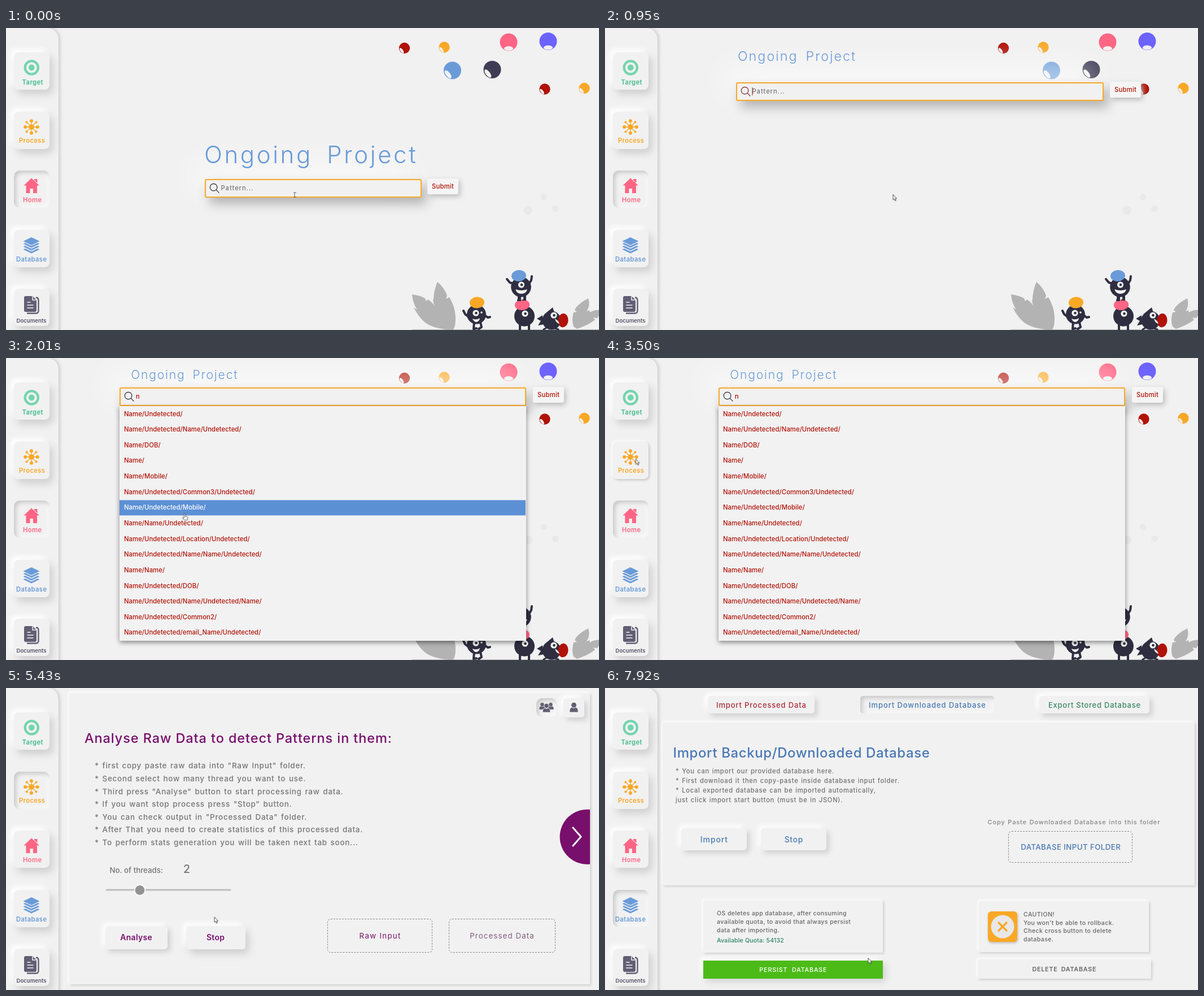
An HTML page that plays this animation: 1050x534 px, repeating every 8000 ms.

```html
<!DOCTYPE html>
<html lang="en">
<head>
<meta charset="utf-8">
<title>Pattern console</title>
<style>
html, body { margin: 0; width: 100%; height: 100%; overflow: hidden; background: #f1f1f1; }
#stage { position: relative; width: 1050px; height: 534px; overflow: hidden; font-family: Inter, sans-serif; }
.scene, svg.layer { position: absolute; left: 0; top: 0; width: 1050px; height: 534px; }
.scene { background: #f1f1f1; overflow: hidden; }
svg { overflow: visible; }
text { font-family: Inter, sans-serif; font-weight: 500; white-space: pre; }
.box { position: absolute; box-sizing: border-box; background: #f1f1f1; }
.side { border-radius: 0 20px 0 0; box-shadow: 2px 0 6px #c4c4c4; }
.card { border-radius: 8px; box-shadow: 6px 8px 14px #cfcfcf, -6px -6px 10px #fff; }
.active { border-radius: 10px; box-shadow: inset 4px 4px 7px #cacaca, inset -3px -3px 6px #fafafa; }
.button { border-radius: 5px; box-shadow: 5px 5px 10px #d0d0d0, -5px -5px 10px #fff; }
.panel { box-shadow: 2px 2px 4px #cdcdcd, -2px -2px 4px #fff; }
.folder { border: 1px dashed #8a8a8a; border-radius: 6px; background: none; }
.field { border: 2.5px solid #f9a826; border-radius: 3px; box-shadow: 8px 11px 20px #b2b2b2, -20px -20px 60px #fff; }
.field svg { position: absolute; left: 0; top: 0; }
.submit { border-radius: 3px; background: #f5f5f5; box-shadow: 3px 4px 10px #bbb; }
.drop { background: #f2f2f2; box-shadow: 0 3px 8px rgba(0, 0, 0, .45); }
</style>
</head>
<body>
<div id="stage"></div>
<script>
const LOOP = 8000;
const RED = '#b01207', ORANGE = '#f9a826', PINK = '#ff6584', BLUE = '#6a9bd8', INK = '#2f2e41',
  SLATE = '#625f74', PURPLE = '#780f6c', GREY = '#757575', NAVY = '#4a78b4';
const RAISED = '6px 8px 14px #cfcfcf, -6px -6px 10px #fff';
const LOW = '2px 2px 4px #c6c6c6, -2px -2px 4px #fff';

// Keyframes written in milliseconds; the last state holds to the end of the loop.
let css = '';
const key = (name, frames) => {
  const all = [...frames, [LOOP, frames[frames.length - 1][1]]];
  css += `@keyframes ${name}{${all.map(([ms, rule]) => `${ms * 100 / LOOP}%{${rule}}`).join('')}}
    .${name}{animation:${name} ${LOOP}ms linear infinite}`;
};
const show = (name, ...toggles) => {
  const state = (on) => `opacity:${on};animation-timing-function:step-end`;
  const start = toggles[0] === 0 ? [] : [[0, state(0)]];
  key(name, [...start, ...toggles.map((ms, i) => [ms, state(i % 2 ? 0 : 1)])]);
};
const EASE = 'animation-timing-function:ease';

const box = (x, y, w, h, cls, inner = '', style = '') =>
  `<div class="box ${cls}" style="left:${x}px;top:${y}px;width:${w}px;height:${h}px;${style}">${inner}</div>`;
const layer = (inner) => `<svg class="layer" viewBox="0 0 1050 534">${inner}</svg>`;
const text = (x, y, size, fill, str, space = 0, more = '') =>
  `<text x="${x}" y="${y}" font-size="${size}" fill="${fill}" letter-spacing="${space}" ${more}>${str}</text>`;
const mid = (x, y, size, fill, str, space = 0, more = '') =>
  text(x + space / 2, y, size, fill, str, space, `text-anchor="middle" ${more}`);
const lines = (x, y, step, size, fill, list, space, more) =>
  list.map((str, i) => text(x, y + i * step, size, fill, str, space, more)).join('');
const disc = (x, y, r, fill, more = '') => `<circle cx="${x}" cy="${y}" r="${r}" fill="${fill}" ${more}/>`;
const oval = (x, y, rx, ry, fill, turn = 0) =>
  `<ellipse rx="${rx}" ry="${ry}" fill="${fill}" transform="translate(${x} ${y}) rotate(${turn})"/>`;
const path = (d, fill, more = '') => `<path d="${d}" fill="${fill}" ${more}/>`;
const line = (d, stroke, width, more = '') =>
  path(d, 'none', `stroke="${stroke}" stroke-width="${width}" stroke-linecap="round" stroke-linejoin="round" ${more}`);

// Sidebar
const network = () => {
  let out = disc(45, 175, 4.8, ORANGE);
  for (let i = 0; i < 8; i++) {
    const reach = i % 2 ? 12 : 10.8, a = i * Math.PI / 4;
    const x = 45 + reach * Math.cos(a), y = 175 + reach * Math.sin(a);
    out += line(`M45 175L${x} ${y}`, ORANGE, 1.3) + disc(x, y, i % 2 ? 2 : 3, ORANGE);
  }
  return out;
};
const layers = () => path('M45 370L59.5 377L45 384L30.5 377Z', BLUE) +
  [0, 5, 10].map((d) => path(`M30.5 ${381.5 + d}L34 ${380 + d}L45 ${385.3 + d}L56 ${380 + d}L59.5 ${381.5 + d}L45 ${388.5 + d}Z`, BLUE)).join('');
const icons = () =>
  `<circle cx="45.3" cy="70" r="11.6" fill="none" stroke="#73d5ad" stroke-width="4.2"/>` + disc(45.3, 70, 5.4, '#73d5ad') +
  network() +
  path('M45 265.5L59 278.5H55V292H48V284H42.5V292H35.5V278.5H31.5ZM50 267H55.5V274L50 269Z', PINK) +
  layers() +
  line('M38 504.5H53Q57.5 504.5 57.5 500V481Q57.5 477.5 54 476.5', SLATE, 2.4) +
  path('M35 474H47L54 481V499Q54 502 51 502H35Q32 502 32 499V477Q32 474 35 474Z', SLATE) +
  line('M47 475V481H53M38 485H43M38 490H48M38 495H48', '#f1f1f1', 1.5);
const LABELS = [['Target', '#3dbb88', 100, 47], ['Process', ORANGE, 202.5, 46], ['Home', PINK, 308, 46.5],
  ['Database', BLUE, 413, 45], ['Documents', '#56546a', 520.5, 45]];
const sidebar = (active, hoverIndex, hoverClass) =>
  box(0, 0, 93, 540, 'side') +
  LABELS.map((_, i) => box(13.5, 43 + i * 104.5, 63, 66,
    i === active ? 'active' : `card ${i === hoverIndex ? hoverClass : ''}`)).join('') +
  layer(icons() + LABELS.map(([name, fill, y, x], i) =>
    mid(x, y, i === 4 ? 9.6 : 11.2, fill, name, i === 4 ? 0 : .4, 'style="font-weight:600"')).join(''));

// Home scene
const ball = (x, y, r, fill, facing) => disc(x, y, r, fill) + (facing === 'down'
  ? oval(x, y + r * .72, r * .52, r * .25, '#f1f1f1')
  : oval(x - r * .5, y + r * .45, r * .24, r * .56, '#f1f1f1', -38));
const balls = () =>
  ball(705.5, 35.5, 9.7, RED) + ball(776, 34, 9.7, ORANGE) + ball(954, 108, 9.7, RED) + ball(1024, 106.5, 9.7, ORANGE) +
  ball(790.5, 75, 15.5, BLUE) + ball(861, 73.5, 15.5, '#3f3d56') +
  ball(890, 25, 15.5, PINK, 'down') + ball(960, 23.5, 15.5, '#6c63ff', 'down') +
  disc(924, 322, 8, '#e9e9e9') + disc(952.5, 299, 5.8, '#e9e9e9') + disc(973, 319.5, 5.8, '#e9e9e9');
const eye = (x, y) => disc(x, y, 5.6, '#f4f4f4') + disc(x + .5, y, 2.3, INK);
const creatures = () =>
  path('M719 471Q734 473 742 478L744 483L747 480Q754 484 759 492Q755 484 757 479Q758 462 764 449Q776 459 781 473L779 479L785 476Q796 494 796 514Q796 530 791 534Q750 532 736 515Q727 505 722 494L728 498Q720 486 719 471Z', '#b3b3b3') +
  path('M1031 478Q1010 489 1007 499L1011 502L1005 503Q1001 518 1005 528L1011 532Q1030 526 1043 516L1040 512L1047 513L1056 499Q1042 497 1034 503L1033 499L1028 501Q1035 491 1031 478Z', '#b3b3b3') +
  line('M719 533.6H1050', '#a9a9ad', 1) +
  line('M818 510L813 506L810 500M848 508L853 512L857 511M829 520L828 532L833 531M840 520L842 529L837 532', INK, 4) +
  disc(833, 506.5, 17, INK) + eye(832, 504) + disc(842, 503, 1.8, '#f4f4f4') +
  path('M826 514Q833 517 839 513Q838 520 832 520Q828 519 826 514Z', '#f4f4f4') + oval(834, 485.5, 13, 10, ORANGE, -4) +
  line('M898 452L892 450L887 444M927 451L930 446L931 439M908 474V483M918 474V482', INK, 4) +
  disc(912, 458, 17.8, INK) + eye(912.5, 454) +
  path('M902 462Q913 466 923 462Q921 470 912 470Q905 470 902 462Z', '#f4f4f4') + oval(908, 438, 13, 10, BLUE, -5) +
  disc(918, 509.5, 18, INK) + line('M910 525V535M926 525V535', INK, 4) + eye(919, 505) + oval(914, 489.5, 13.2, 9.5, PINK, -4) +
  path('M908 472H912V483H905V480H908ZM917 473H921V482H914V480H917Z', INK) +
  disc(966, 517, 16.5, INK) + path('M957 503L968 494L971 503ZM950 508L940 514L947 518L942 526L952 524Z', INK) +
  line('M957 530L952 533M972 531L978 533', INK, 3) + eye(970, 508) + oval(986.5, 517, 9, 12.2, RED, 4) +
  path('M972 514Q978 517 980 523Q974 522 972 514Z', '#f4f4f4');

const U = 'Undetected/', N = 'Name/';
const PATTERNS = [N + U, N + U + N + U, N + 'DOB/', N, N + 'Mobile/', N + U + 'Common3/' + U, N + U + 'Mobile/',
  N + N + U, N + U + 'Location/' + U, N + U + N + N + U, N + N, N + U + 'DOB/', N + U + N + U + N,
  N + U + 'Common2/', N + U + 'email_Name/' + U];
const ROW = 27.64;
const row = (i, fill) => text(8, 17.5 + i * ROW, 11.3, fill, PATTERNS[i], .05);
const picked = (i, cls) =>
  `<g class="${cls}"><rect y="${i * ROW + .5}" width="719" height="27" fill="#5c90d5"/>${row(i, '#fff')}</g>`;

const home = () => layer(balls() + creatures()) +
  box(0, 0, 0, 0, 'field expand',
    `<svg width="10" height="10"><g class="lens" fill="none" stroke-width="1.2"><circle cx="13.6" cy="12.6" r="6.3"/><path d="M18.2 17.2L23.4 22.6"/></g>
    <g class="empty">${text(26.6, 17.5, 11.2, GREY, 'Pattern...', .9)}</g>
    <g class="typed">${text(26.8, 18, 11.5, RED, 'n')}</g>
    <path class="caretA" d="M27 7V21" stroke="${RED}"/><path class="caretB" d="M35 7V20.500" stroke="${RED}"/></svg>`) +
  box(0, 0, 55, 28, 'submit slide', `<svg width="55" height="28">${mid(27.5, 17.8, 11.3, RED, 'Submit', .2)}</svg>`) +
  layer(`<g class="heading">${text(0, 0, 42, BLUE, 'Ongoing Project', 3.6, 'style="font-weight:300;word-spacing:10px"')}</g>`) +
  box(201, 85, 720, 415, 'drop listing', `<svg width="720" height="415">${PATTERNS.map((_, i) => row(i, RED)).join('')}${picked(7, 'pickA')}${picked(6, 'pickB')}</svg>`) +
  sidebar(2, 1, 'hoverProcess');

// Process scene
const person = (x, y, k) =>
  `<g transform="translate(${x} ${y}) scale(${k})">${disc(0, -4, 4.7, SLATE)}${path('M-7.500 9V6Q-7 1 -3 .500Q0 3 3 .500Q7 1 7.500 6V9Z', SLATE)}</g>`;
const process = () => box(112, 9, 922, 515, 'panel') +
  box(939, 18, 36, 33, 'active') + box(987, 18, 37, 34, 'button') +
  box(176, 421, 110, 41, 'button') + box(319, 421, 105, 41, 'button hoverStop') +
  box(569, 408, 186, 60, 'folder') + box(783.5, 408, 189, 60, 'folder') +
  layer(person(949.5, 32, .68) + person(964.500, 32, .68) +
    `<g stroke="#f1f1f1" stroke-width="1">${person(957, 35, .9)}</g>` + person(1005.5, 34, .95) +
    text(139, 97, 23.5, PURPLE, 'Analyse Raw Data to detect Patterns in them:', .9) +
    lines(157, 142.3, 22.6, 13.5, GREY, [
      '* first copy paste raw data into "Raw Input" folder.',
      '* Second select how many thread you want to use.',
      '* Third press "Analyse" button to start processing raw data.',
      '* If you want stop process press "Stop" button.',
      '* You can check output in "Processed Data" folder.',
      '* After That you need to create statistics of this processed data.',
      '* To perform stats generation you will be taken next tab soon...'], .7, 'word-spacing="1.5"') +
    text(183.5, 326.5, 13.3, GREY, 'No. of threads:') + text(314, 326.5, 19.5, GREY, '2') +
    line('M178 357H397', '#bdbdc1', 3) + disc(237, 357.5, 9.2, '#929292', 'stroke="#fff" stroke-width="1.5"') +
    mid(230.5, 446, 14, PURPLE, 'Analyse', .3, 'style="font-weight:600"') +
    mid(371, 446, 14, PURPLE, 'Stop', .3, 'style="font-weight:600"') +
    `<g class="rawHover">${mid(662, 443.3, 13.3, 'currentColor', 'Raw Input', 1.3, 'style="font-weight:400"')}</g>` +
    mid(878, 443.3, 13.3, '#7f5c7b', 'Processed Data', 1.1, 'style="font-weight:400"') +
    path('M1034 215A48.500 48.500 0 1 0 1034 311.500Z', PURPLE) + line('M1004 247L1018 263L1004 279', '#fff', 3)) +
  sidebar(1, 3, 'hoverDatabase');

// Database scene
const SMALL = '#666';
const database = () =>
  box(182, 14, 189, 31, 'button') + box(452, 14, 237, 31, 'active', '', 'border-radius:5px') + box(769, 14, 195, 31, 'button') +
  box(102, 61, 942, 288, 'panel') + box(135, 248, 116, 39, 'button') + box(276, 248, 116, 39, 'button') +
  box(714, 253, 220, 56, 'folder') + box(174, 376, 318, 92, 'panel') + box(662, 377, 301, 90, 'panel') +
  box(174, 482, 318, 32, 'panel', '', 'background:#4cbb17;box-shadow:5px 5px 12px #d2d2d2,-5px -5px 10px #fff') +
  box(660, 480, 307, 34, 'panel') +
  box(678, 395, 52, 54, '', '', `background:${ORANGE};border-radius:6px;box-shadow:1px 2px 4px #bbb`) +
  layer(mid(276.5, 34.5, 13, '#ab2b38', 'Import Processed Data', .85) +
    mid(570.5, 34.5, 13, NAVY, 'Import Downloaded Database', .9) +
    mid(866.5, 34.5, 13, '#3a8864', 'Export Stored Database', .75) +
    text(120.5, 123, 24, NAVY, 'Import Backup/Downloaded Database', .6) +
    lines(125, 150.5, 17, 11.2, '#707070', ['* You can import our provided database here.',
      '* First download it then copy-paste inside database input folder.',
      '* Local exported database can be imported automatically,',
      'just click import start button (must be in JSON).'], .7, 'word-spacing="1"') +
    mid(193, 273, 14, NAVY, 'Import', .9) + mid(334, 273, 14, NAVY, 'Stop', .6) +
    mid(830, 240.500, 11, '#858585', 'Copy Paste Downloaded Database into this folder', .85, 'word-spacing="1"') +
    mid(824.5, 286, 13.3, NAVY, 'DATABASE INPUT FOLDER', .4) +
    lines(198, 402.3, 14.8, 10.6, SMALL, ['OS deletes app database, after consuming',
      'available quota, to avoid that always persist', 'data after importing.'], .38) +
    text(198, 449.5, 10.6, '#2f8468', 'Available Quota: 54132', .15) +
    lines(741, 403.8, 14.8, 10.6, SMALL, ['CAUTION!', "You won't be able to rollback.",
      'Check cross button to delete', 'database.'], .38) +
    mid(333, 502, 10.8, '#fff', 'PERSIST DATABASE', .8, 'word-spacing="4"') +
    mid(813, 500.5, 10.8, SMALL, 'DELETE DATABASE', .7, 'word-spacing="3" style="font-weight:600"') +
    disc(704, 422, 20.5, '#e8e8e8') + line('M697 415L711 429M711 415L697 429', ORANGE, 3.4)) +
  sidebar(3);

const cursor = () => layer(`<g class="pointer">
  <g class="ibeam">${line('M-.500 0H3.500M1.500 0V8M-.500 8H3.500', '#555', .9)}</g>
  <g class="arrow">${path('M0 0V9.500L2.200 7.600L3.800 11L5.300 10.300L3.800 7H6.600Z', '#fff', 'stroke="#3a3a3a" stroke-width=".9"')}</g>
  <g class="hand">${path('M-1 1A1 1 0 0 1 1 1V5L4.500 6Q5.300 6.500 5.200 7.500L4.300 12H-.500L-3.800 7.800Q-3 6.400 -1 8Z', '#fff', 'stroke="#333" stroke-width=".8"')}</g></g>`);

// Timeline
const HOME_END = 3570, PROCESS_END = 5980, TYPED = 1490;
show('sceneHome', 0, HOME_END);
show('sceneProcess', HOME_END, PROCESS_END);
show('sceneDatabase', PROCESS_END);

const at = (x, y, w) => `left:${x}px;top:${y}px;` + (w ? `width:${w}px;height:33.500px;` : '');
const travel = (name, from, to, end) => key(name, [[0, from], [460, from + EASE], [end, to]]);
travel('expand', at(352, 266.5, 384), at(201, 51.5, 720), 1460);
travel('slide', at(745.5, 266), at(933, 51), 1460);
travel('heading', 'transform:translate(351px,238.5px) scale(1);', 'transform:translate(221.2px,36.8px) scale(.503);', 1260);
key('lens', [[0, 'stroke:#26262e'], [460, 'stroke:#26262e'], [720, 'stroke:#962c22'], [1260, 'stroke:#5e1c18'], [TYPED, 'stroke:#26262e']]);
show('empty', 0, TYPED);
show('typed', TYPED);
show('listing', TYPED);
show('caretA', 470, 990);
show('caretB', TYPED, 2000, 2500, 3030);
show('pickA', 1940, 2005);
show('pickB', 2005, 2090);

const lift = (name, ...stops) => key(name, stops.map(([ms, low]) => [ms, `box-shadow:${low ? LOW : RAISED}`]));
lift('hoverProcess', [0, 0], [2340, 0], [2500, 1]);
lift('hoverStop', [0, 0], [4640, 0], [4740, 1], [4820, 1], [4980, 0]);
lift('hoverDatabase', [0, 0], [5760, 0], [5920, 1]);
key('rawHover', [[0, 'color:#7f5c7b'], [4880, 'color:#7f5c7b'], [5030, `color:${PURPLE}`], [5400, `color:${PURPLE}`], [5750, 'color:#7f5c7b']]);

show('ibeam', 0, 480);
show('arrow', 480, 1940, 2090);
show('hand', 1940, 2090);
key('pointer', [
  [0, 509.5, 291], [480, 509.5, 291], [481, 510, 294.5], [1900, 510, 294.5], [1940, 425, 286], [2010, 318, 275],
  [2090, 190, 252], [2180, 90, 225], [2270, 32, 200], [2400, 48, 183], [2500, 54.5, 178.5],
  [3930, 54.5, 178.5], [4100, 100, 215], [4400, 255, 350], [4600, 330, 425], [4740, 350, 440],
  [4800, 350, 440], [4900, 560, 436], [5030, 640, 440], [5320, 640, 440], [5430, 370.5, 405],
  [5560, 180, 385], [5700, 75, 382], [5800, 52, 386], [6330, 52, 386], [6500, 130, 440],
  [6640, 235, 456], [6760, 264, 400], [6880, 215, 310], [6990, 176, 281], [7200, 176, 281],
  [7370, 180, 282], [7500, 180, 282], [7620, 320, 330], [7740, 490, 410], [7810, 524, 450], [7920, 466, 477.5],
].map(([ms, x, y]) => [ms, `transform:translate(${x}px,${y}px)`]));

document.head.insertAdjacentHTML('beforeend', `<style>${css}</style>`);
document.getElementById('stage').innerHTML =
  `<div class="scene sceneHome">${home()}</div><div class="scene sceneProcess">${process()}</div>
   <div class="scene sceneDatabase">${database()}</div>${cursor()}`;
</script>
</body>
</html>
```
